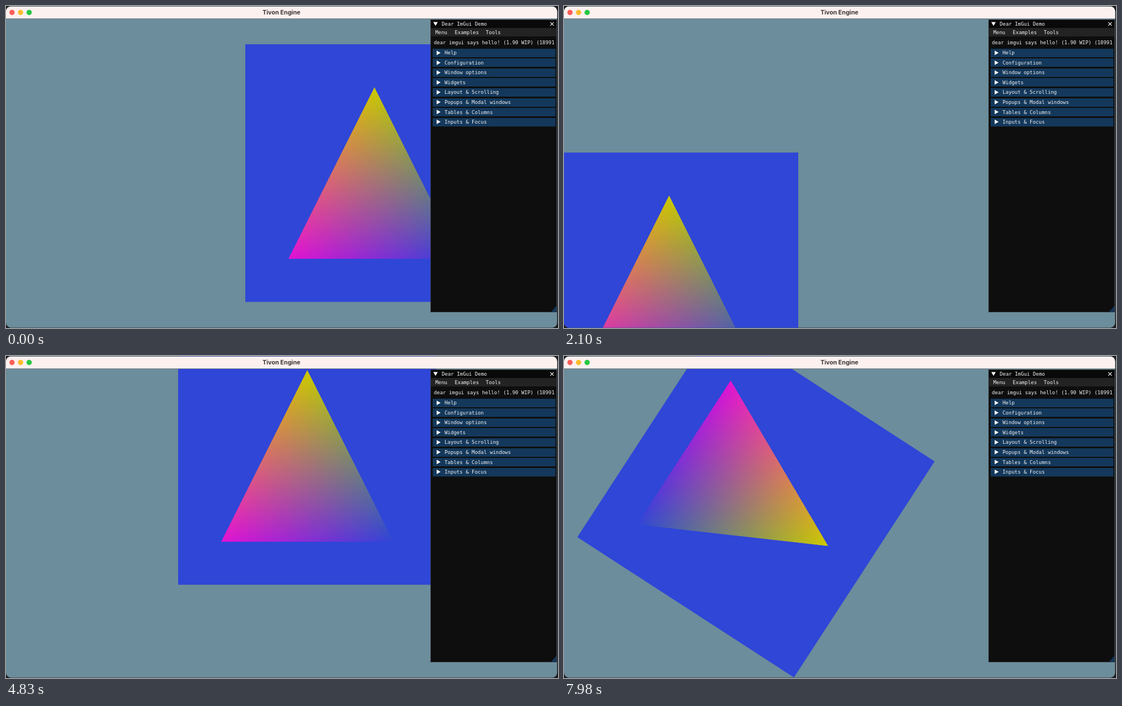
An HTML page with a canvas that plays this animation: 978x572 px, repeating every 8 s.

```html
<!DOCTYPE html>
<html lang="en">
<head>
<meta charset="utf-8">
<title>Tivon Engine</title>
<style>
  html, body { margin: 0; width: 100%; height: 100%; overflow: hidden; background: #1d1d1f; }
  canvas { display: block; }
</style>
</head>
<body>
<canvas id="stage" width="978" height="572"></canvas>
<script>
const LOOP = 8000, STEP = 70;
const UNIT = 305.1;              // pixels per world unit
const HALF = UNIT * 0.75;        // half the side of the square
const VIEW = { x: 488.5, y: 296.8 };
const BLUE = [47, 70, 215], MAGENTA = [226, 18, 212], YELLOW = [204, 202, 0];
const MONO = '8.9px "DejaVu Sans Mono", monospace';

// Camera tracks as [time, value]; linear between keys.
const trackX = [[385, 164.3], [632, 13.3], [943, 13.3], [1460, -302.3],
                [2345, -302.3], [2869, -622.3], [3150, -622.3], [4243, 45.3]];
const trackY = [[1786, 0], [2100, 192.3], [2215, 262], [2490, 262], [2720, 402.7],
                [3290, 402.7], [4144, -119.3], [5535, -119.3], [5810, 49],
                [5915, 49], [5965, 79.5], [6490, 79.5], [6601, 147.5]];
const trackAngle = [[6900, 0], [7980, 123]];

const ctx = document.getElementById('stage').getContext('2d');

function sample(track, t) {
  if (t <= track[0][0]) return track[0][1];
  for (let i = 1; i < track.length; i++) {
    const [t0, v0] = track[i - 1], [t1, v1] = track[i];
    if (t <= t1) return v0 + (v1 - v0) * (t - t0) / (t1 - t0);
  }
  return track[track.length - 1][1];
}

function newLayer(width, height) {
  const layer = document.createElement('canvas');
  layer.width = width;
  layer.height = height;
  return layer;
}

function rect(g, color, x, y, w, h) {
  g.fillStyle = color;
  g.fillRect(x, y, w, h);
}

function polygon(g, color, points) {
  g.fillStyle = color;
  g.beginPath();
  points.forEach(([x, y]) => g.lineTo(x, y));
  g.closePath();
  g.fill();
}

// Blends the three vertex colours by adding one fading gradient per vertex.
function makeTriangle() {
  const scale = 2, half = UNIT / 2, size = Math.ceil(UNIT) + 4;
  const layer = newLayer(size * scale, size * scale);
  const g = layer.getContext('2d');
  g.scale(scale, scale);
  g.translate(size / 2, size / 2);
  const corners = [[0, -half], [-half, half], [half, half]];
  const colors = [YELLOW, MAGENTA, BLUE];
  rect(g, '#000', -size / 2, -size / 2, size, size);
  g.globalCompositeOperation = 'lighter';
  corners.forEach(([x, y], i) => {
    const [ax, ay] = corners[(i + 1) % 3], [bx, by] = corners[(i + 2) % 3];
    const dx = bx - ax, dy = by - ay;
    const k = ((x - ax) * dx + (y - ay) * dy) / (dx * dx + dy * dy);
    const fade = g.createLinearGradient(x, y, ax + k * dx, ay + k * dy);
    fade.addColorStop(0, `rgb(${colors[i]})`);
    fade.addColorStop(1, '#000');
    rect(g, fade, -size / 2, -size / 2, size, size);
  });
  g.globalCompositeOperation = 'destination-in';
  polygon(g, '#000', corners);
  return { layer, size };
}

function makeChrome() {
  const layer = newLayer(978, 572);
  const g = layer.getContext('2d');

  rect(g, '#fdf1f0', 0, 1, 977, 21);
  rect(g, '#7d8589', 0, 22, 977, 1);
  ['#fe5f57', '#febc2e', '#28c840'].forEach((color, i) => {
    g.fillStyle = color;
    g.beginPath();
    g.arc(10.6 + i * 15.2, 11.5, 4.7, 0, Math.PI * 2);
    g.fill();
  });
  g.font = 'bold 10.6px Inter, sans-serif';
  g.textAlign = 'center';
  g.fillStyle = '#3b3536';
  g.fillText('Tivon Engine', 488, 15);

  rect(g, '#2c2d33', 752, 24, 224, 520);
  rect(g, '#0e0e0e', 753, 25, 222, 518);
  rect(g, '#090909', 753, 25, 222, 14);
  rect(g, '#232323', 753, 39, 222, 15);
  polygon(g, '#14385b', [[975, 533], [975, 543], [966, 543]]);
  polygon(g, '#fff', [[757, 28.5], [765, 28.5], [761, 35.3]]);
  g.strokeStyle = '#fff';
  g.lineWidth = 1.1;
  g.beginPath();
  g.moveTo(964.4, 28.8); g.lineTo(970.4, 34.8);
  g.moveTo(970.4, 28.8); g.lineTo(964.4, 34.8);
  g.stroke();

  g.font = MONO;
  g.textAlign = 'left';
  const label = (text, x, y) => {
    g.fillStyle = '#f4f4f4';
    g.fillText(text, x, y + 3.2);
  };
  label('Dear ImGui Demo', 772, 32);
  label('Menu', 760.5, 47);
  label('Examples', 795, 47);
  label('Tools', 850, 47);
  label('dear imgui says hello! (1.90 WIP) (18991', 758, 65);
  ['Help', 'Configuration', 'Window options', 'Widgets', 'Layout & Scrolling',
   'Popups & Modal windows', 'Tables & Columns', 'Inputs & Focus'].forEach((text, i) => {
    const y = 83.2 + i * 17.52;
    rect(g, '#14385b', 756, Math.round(y - 7.3), 217.5, 15);
    polygon(g, '#fff', [[763, y - 4], [763, y + 4], [770, y]]);
    label(text, 777, y);
  });
  return layer;
}

const triangle = makeTriangle();
const chrome = makeChrome();

function draw(t) {
  rect(ctx, '#1d1d1f', 0, 0, 978, 572);
  ctx.save();
  ctx.beginPath();
  ctx.roundRect(0, 0.5, 976.5, 571, 9);
  ctx.clip();
  rect(ctx, '#6c8d9b', 0, 0, 978, 572);

  ctx.save();
  ctx.translate(VIEW.x, VIEW.y);
  ctx.rotate(sample(trackAngle, t) * Math.PI / 180);
  ctx.translate(sample(trackX, t), sample(trackY, t));
  rect(ctx, `rgb(${BLUE})`, -HALF, -HALF, HALF * 2, HALF * 2);
  const { layer, size } = triangle;
  ctx.drawImage(layer, -size / 2, -size / 2, size, size);
  ctx.restore();

  ctx.drawImage(chrome, 0, 0);
  ctx.restore();
}

const start = performance.now();
function tick() {
  const t = (performance.now() - start) % LOOP;
  draw(Math.floor(t / STEP) * STEP);
  requestAnimationFrame(tick);
}
tick();
</script>
</body>
</html>
```
